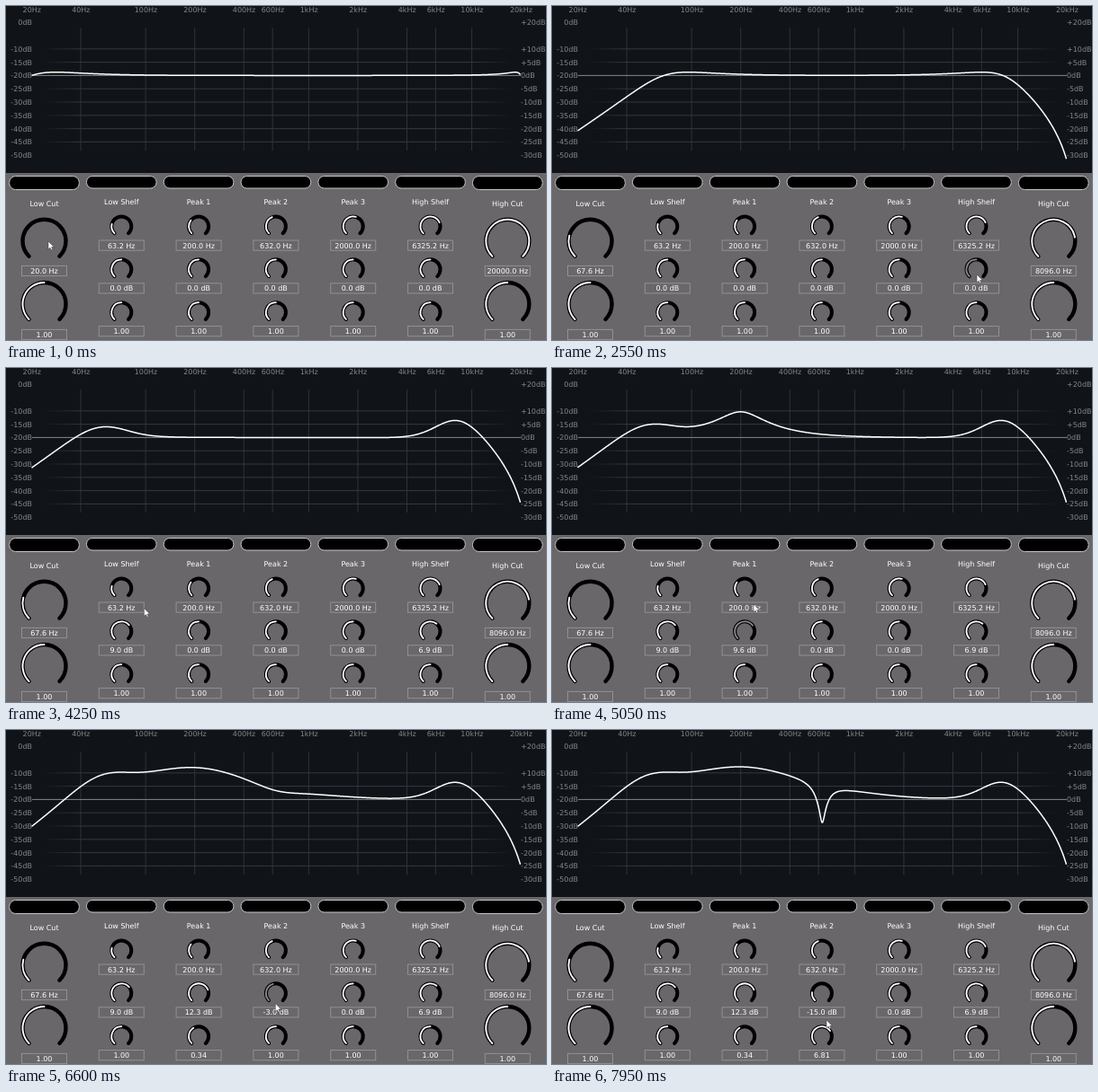
Write an HTML page that moves like this. It is 600 px wide and 372 px high and loops after 8 s.

```html
<!DOCTYPE html>
<html lang="en">
<head>
<meta charset="utf-8">
<title>Equalizer</title>
<style>
  html, body { margin: 0; width: 100%; height: 100%; overflow: hidden; background: #69676a; }
  svg { display: block; width: 600px; height: 372px; }
  text { font: 8px "DejaVu Sans", Verdana, sans-serif; text-rendering: geometricPrecision; }
</style>
</head>
<body>
<svg id="stage" viewBox="0 0 600 372">
  <defs>
    <linearGradient id="fade" gradientUnits="userSpaceOnUse" x1="29" y1="0" x2="572" y2="0">
      <stop offset=".02" stop-color="#34373b" stop-opacity="0"/>
      <stop offset=".1" stop-color="#34373b"/>
      <stop offset=".9" stop-color="#34373b"/>
      <stop offset=".98" stop-color="#34373b" stop-opacity="0"/>
    </linearGradient>
  </defs>
</svg>
<script>
const LOOP = 8000, TICK = 50, RATE = 48000;
const LEFT = 28.5, SPAN = 543.6, ZERO = 77.4, PX_DB = 2.96, PANEL = 186;
const START = 225, SWEEP = 270;
const stage = document.getElementById('stage');

function add(tag, attrs, text) {
  const el = document.createElementNS('http://www.w3.org/2000/svg', tag);
  for (const k in attrs) el.setAttribute(k, attrs[k]);
  if (text !== undefined) el.textContent = text;
  stage.appendChild(el);
  return el;
}

const label = (x, y, text, anchor, fill) =>
  add('text', { x, y, 'text-anchor': anchor, fill }, text);
const freqX = f => LEFT + SPAN * Math.log10(f / 20) / 3;
const dbY = db => ZERO - db * PX_DB;

// Interpolates [time, value, time, value, ...], with values mapped by pos
function track(keys, t, pos = v => v) {
  if (t <= keys[0]) return pos(keys[1]);
  for (let i = 2; i < keys.length; i += 2) {
    if (t < keys[i]) {
      const p = (t - keys[i - 2]) / (keys[i] - keys[i - 2]);
      const a = pos(keys[i - 1]), b = pos(keys[i + 1]);
      return a + (b - a) * p;
    }
  }
  return pos(keys[keys.length - 1]);
}

// Plot
add('rect', { width: 600, height: PANEL, fill: '#101419' });
for (const f of [20, 40, 100, 200, 400, 600, 1000, 2000, 4000, 6000, 10000, 20000]) {
  const x = freqX(f);
  if (f > 20 && f < 20000)
    add('line', { x1: x, x2: x, y1: 24, y2: 161, stroke: '#303338', 'stroke-width': 1 });
  label(x + .3, 7, f < 1000 ? f + 'Hz' : f / 1000 + 'kHz', 'middle', '#858585');
}
for (const db of [20, 10, 5, 0, -5, -10, -15, -20, -25, -30]) {
  const y = dbY(db);
  if (db < 20 && db > -30)
    add('rect', { x: 29, y: y - .5, width: 543, height: 1, fill: db ? 'url(#fade)' : '#858585' });
  label(29, y + 3, db - 20 + 'dB', 'end', '#858585');
  label(572, y + 3, (db > 0 ? '+' : '') + db + 'dB', 'start', '#858585');
}
const curve = add('path', { fill: 'none', stroke: '#fff', 'stroke-width': 1.5, 'stroke-linejoin': 'round' });

// Each kind maps a value to a knob position, back, and to a caption
const kinds = {
  freq: {
    pos: v => ((v - 20) / 19980) ** .25,
    val: p => 20 + 19980 * p ** 4,
    text: v => v.toFixed(1) + ' Hz'
  },
  gain: {
    pos: v => v / 48 + .5,
    val: p => (p - .5) * 48,
    text: v => (Math.abs(v) < .05 ? 0 : v).toFixed(1) + ' dB'
  },
  q: {
    pos: v => Math.log10(v) / 4 + .5,
    val: p => 10 ** (p * 4 - 2),
    text: v => v.toFixed(2)
  }
};
const bands = [
  { name: 'Low Cut', type: 'highpass', freq: 20 },
  { name: 'Low Shelf', type: 'lowshelf', freq: 63.2 },
  { name: 'Peak 1', type: 'peak', freq: 200 },
  { name: 'Peak 2', type: 'peak', freq: 632 },
  { name: 'Peak 3', type: 'peak', freq: 2000 },
  { name: 'High Shelf', type: 'highshelf', freq: 6325.2 },
  { name: 'High Cut', type: 'lowpass', freq: 20000 }
];
const moves = {
  '0freq': [350, 20, 700, 30, 850, 30, 1300, 67.6],
  '6freq': [1800, 20000, 2350, 8096],
  '5gain': [2650, 0, 3050, 6.9],
  '1gain': [3550, 0, 4050, 8.6, 4150, 9],
  '2gain': [4600, 0, 5050, 9.6, 5200, 12.3],
  '2q': [5550, 1, 5750, .38, 5850, .34],
  '3gain': [6450, 0, 6650, -4, 7050, -15],
  '3q': [7350, 1, 7850, 6.81]
};
const drags = [
  [350, 1300, '0freq'], [1850, 2350, '6freq'], [2700, 3200, '5gain'], [3600, 4150, '1gain'],
  [4650, 5200, '2gain'], [5600, 5850, '2q'], [6500, 7050, '3gain'], [7400, 7850, '3q']
];
const cursorX = [850, 47, 1300, 48, 1550, 592, 1650, 584, 2350, 582, 2550, 472, 3050, 471, 3250, 471,
  3500, 126, 4150, 128, 4500, 217, 4650, 217, 5050, 224, 5200, 227, 5450, 212, 5850, 212,
  6200, 299, 7350, 300, 7950, 305];
const cursorY = [350, 262, 700, 247, 850, 247, 1300, 236, 1650, 260, 1850, 260, 2350, 288, 2550, 299,
  2700, 299, 3050, 274, 3250, 274, 3500, 289, 3600, 289, 4150, 258, 4500, 291, 4650, 291,
  5050, 263, 5200, 255, 5450, 341, 5550, 341, 5750, 348, 5850, 350, 6200, 291, 6450, 291,
  7050, 345, 7350, 345, 7950, 323];

// Controls
const knobs = [];
function arc(cx, cy, r, p) {
  const at = deg => {
    const a = deg * Math.PI / 180;
    return (cx + r * Math.sin(a)).toFixed(2) + ' ' + (cy - r * Math.cos(a)).toFixed(2);
  };
  const turn = SWEEP * p;
  return `M${at(START)}A${r} ${r} 0 ${turn > 180 ? 1 : 0} 1 ${at(START + turn)}`;
}
function addKnob(key, kind, cx, cy, big, boxY) {
  const r = big ? 24 : 11, wide = big ? 4.4 : 4;
  add('path', { d: arc(cx, cy, r, 1), fill: 'none', stroke: '#000', 'stroke-width': wide, 'stroke-linecap': 'round' });
  const fill = add('path', { fill: 'none', 'stroke-width': big ? 1.9 : 1.8, 'stroke-linecap': 'round' });
  add('rect', { x: cx - 25, y: boxY - 5.6, width: 50, height: 11.2, fill: 'none', stroke: '#919093' });
  const text = label(cx, boxY + 3, '', 'middle', '#fff');
  knobs.push({ key, kind, cx, cy, r, reach: big ? 27 : 12, fill, text });
}
add('rect', { y: PANEL, width: 600, height: 372 - PANEL, fill: '#69676a' });
bands.forEach((b, i) => {
  const cx = 299.9 + (i - 3) * 85.8, cut = i % 6 === 0;
  b.gain = 0;
  b.q = 1;
  add('rect', {
    x: cx - 38.8, y: 189.5, width: 77.6, height: cut ? 15 : 13.5, rx: cut ? 7 : 6.5, fill: '#000', stroke: '#c4c4c6'
  });
  label(cx, cut ? 223 : 221, b.name, 'middle', '#fff');
  if (cut) {
    addKnob(i + 'freq', 'freq', cx, 261.8, true, 295);
    addKnob(i + 'q', 'q', cx, 332, true, 366);
  } else {
    ['freq', 'gain', 'q'].forEach((kind, row) =>
      addKnob(i + kind, kind, cx, 245.4 + row * 47.9, false, 266.6 + row * 47.8));
  }
});
const cursor = add('path', {
  d: 'M0 0V9L2.1 7.2L3.5 10L4.9 9.3L3.6 6.6H6.3Z', fill: '#fff', stroke: '#333', 'stroke-width': .5
});

function value(i, kind, t) {
  const keys = moves[i + kind], { pos, val } = kinds[kind];
  return keys ? val(track(keys, t, pos)) : bands[i][kind];
}

// Second-order response in dB at warped frequency ratio r
function response(type, r, q, gain) {
  const A = 10 ** (gain / 40), s = r * r, root = Math.sqrt(A) * r / q;
  const ratio = (n, ni, d, di) => 20 * Math.log10(Math.hypot(n, ni) / Math.hypot(d, di));
  switch (type) {
    case 'highpass': return ratio(s, 0, 1 - s, r / q);
    case 'lowpass': return ratio(1, 0, 1 - s, r / q);
    case 'peak': return ratio(1 - s, r * A / q, 1 - s, r / (A * q));
    case 'lowshelf': return ratio(A * (A - s), A * root, 1 - A * s, root);
    default: return ratio(A * (1 - A * s), A * root, A - s, root);
  }
}

const warp = f => Math.tan(Math.PI * f / RATE);

function drawCurve(t) {
  const live = bands.map((b, i) => ({
    type: b.type, w: warp(value(i, 'freq', t)), q: value(i, 'q', t), gain: value(i, 'gain', t)
  })).filter(b => b.gain || b.type.endsWith('pass'));
  let d = '';
  for (let x = 0; x <= SPAN - .5; x += .5) {
    const w = warp(20 * 10 ** (3 * x / SPAN));
    let db = 0;
    for (const b of live) db += response(b.type, w / b.w, b.q, b.gain);
    d += (x ? 'L' : 'M') + (LEFT + x) + ' ' + dbY(db).toFixed(2);
  }
  curve.setAttribute('d', d);
}

function draw(t) {
  const mx = track(cursorX, t), my = track(cursorY, t);
  const drag = drags.find(([from, to]) => t >= from && t <= to);
  for (const k of knobs) {
    const kind = kinds[k.kind], v = value(+k.key[0], k.kind, t), p = kind.pos(v);
    const near = Math.abs(mx - k.cx) < k.reach + 3 && Math.abs(my - k.cy) < k.reach;
    const hot = drag ? drag[2] === k.key : near;
    k.fill.setAttribute('d', p > .001 ? arc(k.cx, k.cy, k.r, Math.min(p, 1)) : '');
    k.fill.setAttribute('stroke', hot ? '#8a898b' : '#fff');
    k.text.textContent = kind.text(v);
  }
  drawCurve(t);
  cursor.setAttribute('transform', `translate(${mx.toFixed(1)} ${my.toFixed(1)})`);
}

const begin = performance.now();
let last = -1;
function frame(now) {
  const t = Math.floor(Math.max(0, now - begin) % LOOP / TICK) * TICK;
  if (t !== last) draw(last = t);
  requestAnimationFrame(frame);
}
draw(0);
requestAnimationFrame(frame);
</script>
</body>
</html>
```
